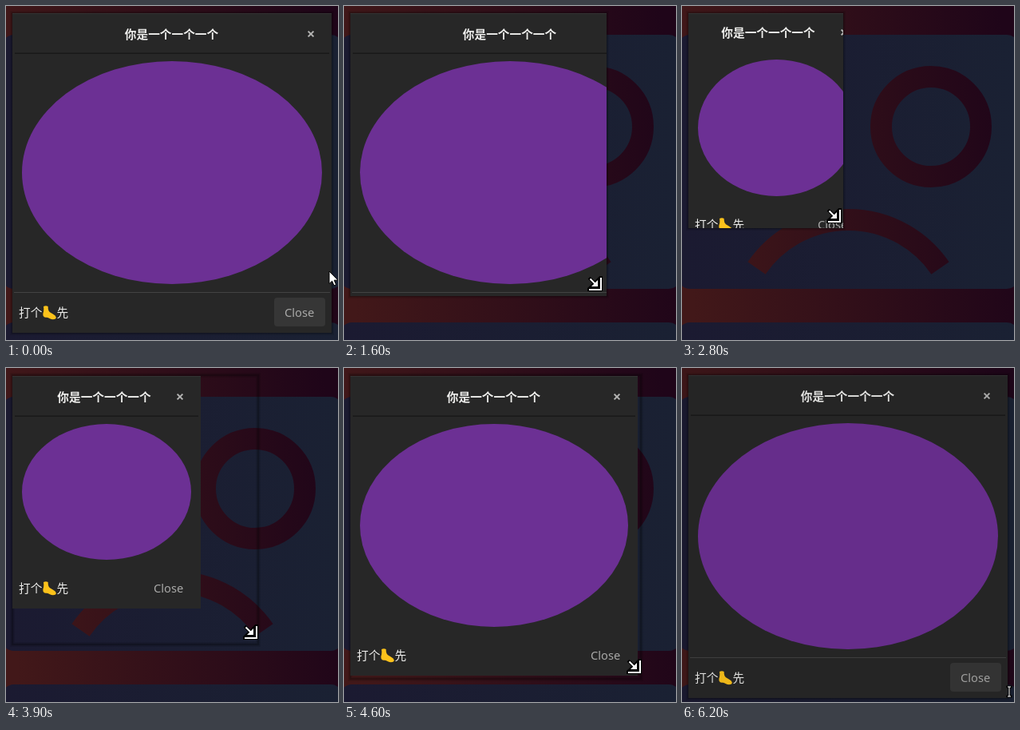
An HTML page that plays this animation: 416x418 px, repeating every 6300 ms.

```html
<!DOCTYPE html>
<html lang="zh">
<head>
<meta charset="utf-8">
<title>Resizing a dialog</title>
<style>
  html, body { margin: 0; width: 100%; height: 100%; overflow: hidden; background: #1b1d31; }
  svg { display: block; width: 416px; height: 418px; }
  text { font: 14.667px "Noto Sans", "Noto Sans CJK SC", "Noto Sans CJK", sans-serif; fill: #eeeeec; }
  .title { font-family: "Noto Sans CJK SC", "Noto Sans CJK", sans-serif; font-weight: 700; text-anchor: middle; }
  .close { fill: #a9a9a8; }
</style>
</head>
<body>
<svg viewBox="0 0 416 418">
  <defs>
    <linearGradient id="red" gradientUnits="userSpaceOnUse" x1="0" y1="230" x2="416" y2="190">
      <stop offset="0" stop-color="#421819"/>
      <stop offset="1" stop-color="#1f0519"/>
    </linearGradient>
    <linearGradient id="blue" gradientUnits="userSpaceOnUse" x1="0" y1="0" x2="416" y2="0">
      <stop offset="0" stop-color="#1b1a31"/>
      <stop offset="1" stop-color="#1a2133"/>
    </linearGradient>
    <clipPath id="crop"><rect id="cropBox" x="8" y="9"/></clipPath>
  </defs>

  <rect width="416" height="418" fill="url(#red)"/>
  <g fill="url(#blue)">
    <rect x="-5" y="36" width="427" height="318" rx="15"/>
    <rect x="-5" y="396" width="427" height="60" rx="15"/>
  </g>
  <g fill="none" stroke="url(#red)" stroke-width="27">
    <circle cx="312" cy="151" r="62.5"/>
    <path d="M93.5 328A139.5 139.5 0 0 1 323.5 328"/>
  </g>

  <g fill="none" stroke="#000">
    <rect class="shade" x="8" y="9" stroke-width="6" stroke-opacity=".1"/>
    <rect class="shade" x="8" y="9" stroke-width="2.5" stroke-opacity=".25"/>
  </g>

  <g clip-path="url(#crop)">
    <rect id="win" x="8" fill="#272727"/>
    <rect id="edge" x="8" height="1" fill="#333"/>
    <g id="head">
      <text id="title" class="title" y="41">你是一个一个一个</text>
      <path id="cross" d="M-3.4-3.4L3.4 3.4M3.4-3.4L-3.4 3.4" stroke="#b4b4b3" stroke-width="2"/>
      <rect id="rule" x="11" y="58.5" height="1.5" fill="#191919"/>
    </g>
    <ellipse id="oval" fill="#6c3094"/>
    <g id="foot">
      <g id="bar">
        <rect id="line" x="10" y="-51" height="1" fill="#424242"/>
        <rect id="button" y="-44" width="64" height="36" rx="4" fill="#363636"/>
      </g>
      <text x="16" y="-20">打个</text>
      <path transform="translate(45.5 -34)" fill="#fcc21b"
        d="M1.5 1Q4.5-.3 7.2 1Q6.8 6 9.5 8.2Q13 10 16.2 12.5Q18 14.5 16.5 16.6Q13 18 9.5 16.2Q6.8 14.2 4.8 14.8Q2.2 15.2 1 12.6Q.4 10 1.6 7.2Q2.1 4 1.5 1Z"/>
      <text x="63.4" y="-20">先</text>
      <text id="close" class="close" y="-20">Close</text>
    </g>
  </g>

  <rect id="dim" width="416" height="418" fill="#000" opacity=".06"/>

  <path id="arrow" d="M0 0V15.5L3.6 12.2L6 17.8L8.6 16.7L6.2 11.2H11Z" fill="#fff" stroke="#000"/>
  <g id="grip" fill="none">
    <path d="M-8 7H7V-8M-6.5-6.5L2 2M3-5V3H-5Z" stroke="#000" stroke-width="4" stroke-linecap="square"/>
    <path d="M-8 7H7V-8M-6.5-6.5L2 2" stroke="#fff" stroke-width="2"/>
    <path d="M3-5V3H-5Z" fill="#fff"/>
  </g>
  <g id="beam" fill="none">
    <path d="M-2-6H2M0-6V6M-2 6H2" stroke="#000" stroke-width="3" stroke-linecap="square"/>
    <path d="M-2-6H2M0-6V6M-2 6H2" stroke="#fff"/>
  </g>
</svg>
<script>
const LOOP = 6300, STEP = 100;
const MIN_RIGHT = 229, MIN_BOTTOM = 299;
const PRESS = 700, GROW = 3230, CATCH_UP = 4000, SETTLE = 5700, LEAVE = 6000;

// [ms, right, bottom] of the dragged corner
const drag = [
  [1200, 408, 409], [1600, 329, 363], [2400, 229, 299], [2500, 229, 299],
  [2800, 202, 278], [3000, 195, 270], [GROW, 195, 270], [3900, 316, 346],
  [4200, 336, 361], [5000, 408, 416], [5500, 408, 416], [SETTLE, 408, 413]
];

const $ = id => document.getElementById(id);
const shades = document.querySelectorAll('.shade');
const set = (el, attrs) => {
  for (const k in attrs) el.setAttribute(k, attrs[k]);
};
const show = (id, on) => set($(id), { display: on ? 'inline' : 'none' });
const move = (id, x, y) => set($(id), { transform: `translate(${x} ${y})` });
const clamp = (v, lo, hi) => Math.min(hi, Math.max(lo, v));

function corner(time) {
  const t = clamp(time, drag[0][0], SETTLE);
  const i = Math.max(1, drag.findIndex(k => k[0] >= t));
  const a = drag[i - 1], b = drag[i];
  const p = (t - a[0]) / (b[0] - a[0]);
  return [1, 2].map(n => Math.round(a[n] + (b[n] - a[n]) * p));
}

// The content is laid out late and never below its minimum size.
function content(t) {
  const lag = t < CATCH_UP ? 400 : t < SETTLE ? 50 : 0;
  const [right, bottom] = corner(t - lag);
  return [Math.max(right, MIN_RIGHT), Math.max(bottom, MIN_BOTTOM)];
}

function drawPointer(t, right, bottom) {
  const kind = t < PRESS ? 'arrow' : t < LEAVE ? 'grip' : 'beam';
  for (const id of ['arrow', 'grip', 'beam']) show(id, id === kind);
  const p = clamp((t - 200) / 300, 0, 1);
  if (kind === 'arrow') move(kind, 405 + 6 * p, 332 + 72 * p);
  if (kind === 'grip') move(kind, Math.round(right - 17 + t / 500), bottom - 15);
  if (kind === 'beam') move(kind, 408 + (t - LEAVE) / 100, 405);
}

function draw(t) {
  const [fr, fb] = corner(t);
  const [right, bottom] = content(t);
  const idle = t < 1800 || t >= SETTLE;
  const shift = idle ? 0 : t < GROW ? -2 : 1;
  const top = shift > 0 ? 10 : 9;
  const mid = (8 + right) / 2;

  shades.forEach(s => set(s, { width: fr - 8, height: fb - 9 }));
  set($('cropBox'), { width: Math.min(fr, right) - 8, height: Math.min(fb, bottom) - 9 });
  set($('win'), { y: top, width: right - 8, height: bottom - top });
  set($('edge'), { y: top, width: right - 8 });

  move('head', 0, shift);
  set($('title'), { x: Math.min(mid - .5, right - 121) });
  move('cross', right - 26, 35);
  set($('rule'), { width: right - 14, opacity: shift < 0 ? 0 : 1 });

  const y0 = 69 + shift, y1 = bottom - 61;
  set($('oval'), { cx: mid, cy: (y0 + y1) / 2, rx: mid - 20, ry: (y1 - y0) / 2 });

  move('foot', 0, bottom);
  show('bar', idle);
  set($('line'), { width: right - 12 });
  set($('button'), { x: right - 72 });
  set($('close'), { x: right - 59 });

  show('dim', t >= SETTLE);
  drawPointer(t, fr, fb);
}

const start = performance.now();
function tick() {
  const t = (performance.now() - start) % LOOP;
  draw(Math.floor(t / STEP) * STEP);
  requestAnimationFrame(tick);
}
tick();
</script>
</body>
</html>
```
